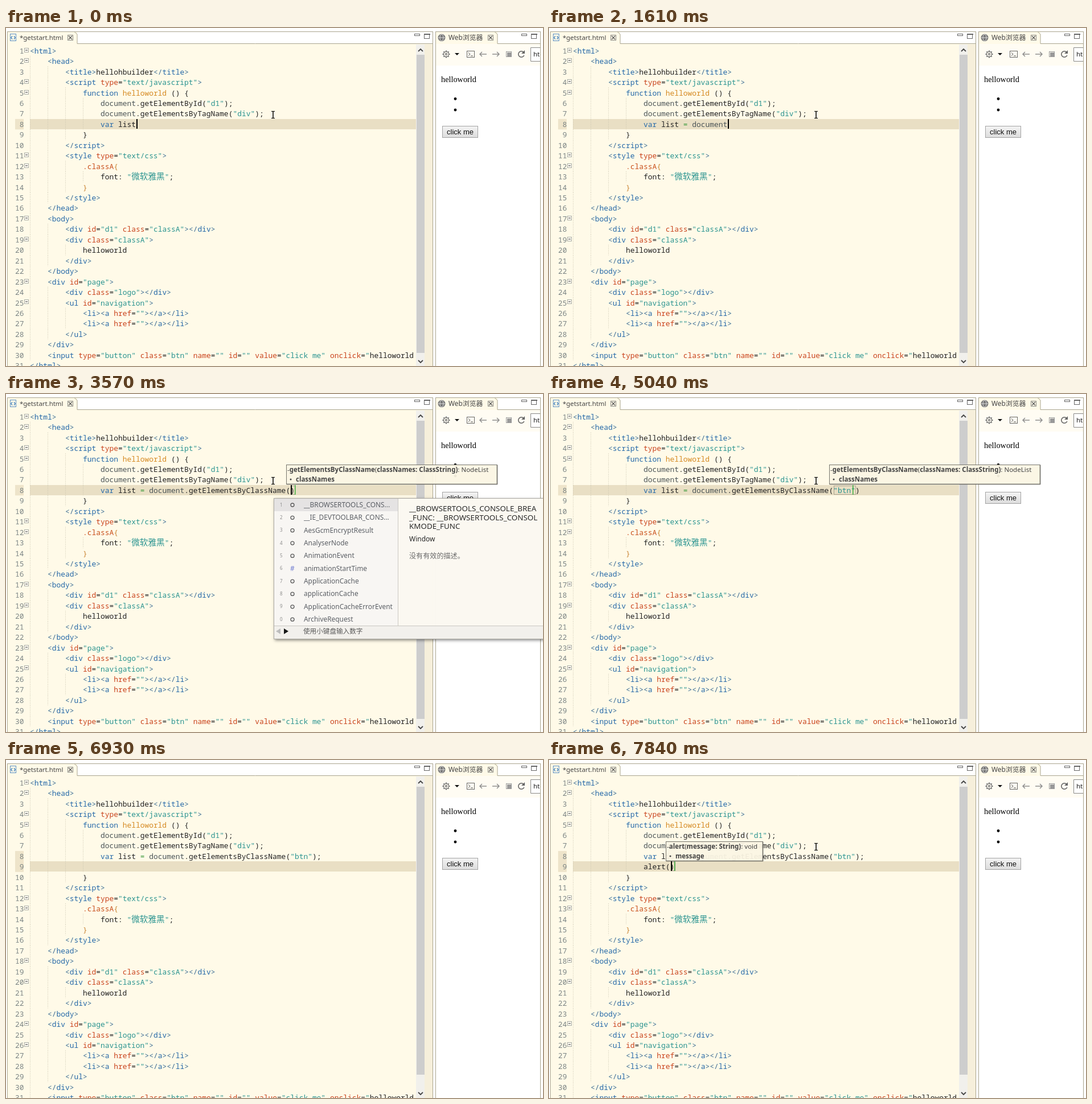
An HTML page with a canvas for the animation above (8000 ms loop, 943 by 594 pixels).

```html
<!DOCTYPE html>
<html lang="en">
<head>
<meta charset="utf-8">
<title>Code editor typing</title>
<style>
html, body { margin: 0; width: 100%; height: 100%; overflow: hidden; background: #fff; }
canvas { display: block; }
</style>
</head>
<body>
<canvas id="stage" width="943" height="594"></canvas>
<script>
const g = document.getElementById('stage').getContext('2d');
const LOOP = 8000, CELL = 7.75, ROW = 18.45, LEFT = 42, TOP = 30.7;
const CREAM = '#fffae8', EDGE = '#aaa58e', BAND = '#e9dfc4';
const MONO = '12.9px "Noto Sans Mono", monospace';
const sans = (size, bold = '') => `${bold} ${size}px "Noto Sans", "Noto Sans CJK SC", "Noto Sans CJK", sans-serif`;

// A leading digit gives the indent level of each line.
const head = [
  '0<html>',
  '1<head>',
  '2<title>hellohbuilder</title>',
  '2<script type="text/javascript">',
  '3function helloworld () {',
  '4document.getElementById("d1");',
  '4document.getElementsByTagName("div");'
];
const tail = [
  '3}',
  '2<\/script>',
  '2<style type="text/css">',
  '3.classA{',
  '4font: "微软雅黑";',
  '3}',
  '2</style>',
  '1</head>',
  '1<body>',
  '2<div id="d1" class="classA"></div>',
  '2<div class="classA">',
  '3helloworld',
  '2</div>',
  '1</body>',
  '1<div id="page">',
  '2<div class="logo"></div>',
  '2<ul id="navigation">',
  '3<li><a href=""></a></li>',
  '3<li><a href=""></a></li>',
  '2</ul>',
  '1</div>',
  '1<input type="button" class="btn" name="" id="" value="click me" onclick="helloworld',
  '0</html>'
];
const foldable = /^\d(<html|<head|<script|function|<style|\.classA|<body|<div class="classA">|<div id="page|<ul)/;

// Token kinds in order of priority, each with its colour.
const kinds = [
  [/"[\w\/ ]*"|"/, '#2a9490'],
  [/<\/?|>/, '#3d6c93'],
  [/(?<=<\/?)\w+|function|var(?= )/, '#2468a8'],
  [/\w+(?==)/, '#c9431c'],
  [/helloworld(?= \()/, '#d58a22'],
  [/\.classA/, '#c9501c'],
  [/[一-龥]+/, '#2a9490'],
  [/=(?= |$)/, '#3f9b3f'],
  [/document/, '#4c5557'],
  [/\w+|\s+|[^\w\s]/, '#222']
];
const WIDE = 6;
const TOKEN = new RegExp(kinds.map(k => `(${k[0].source})`).join('|'), 'g');

const rect = (x, y, w, h, color) => { g.fillStyle = color; g.fillRect(x, y, w, h); };
const frame = (x, y, w, h, color) => {
  g.strokeStyle = color; g.lineWidth = 1; g.strokeRect(x, y, w, h);
};
function text(s, x, y, font, color = '#333') {
  g.font = font; g.fillStyle = color; g.fillText(s, x, y);
  return x + g.measureText(s).width;
}
function path(points, color, width = 1, fill = false) {
  g.beginPath();
  points.forEach(([x, y]) => g.lineTo(x, y));
  g.lineWidth = width; g.strokeStyle = g.fillStyle = color;
  fill ? g.fill() : g.stroke();
}
function disc(x, y, r, color, hollow) {
  g.beginPath(); g.arc(x, y, r, 0, 7);
  g.strokeStyle = g.fillStyle = color; g.lineWidth = 1.3;
  hollow ? g.stroke() : g.fill();
}
const colX = c => LEFT + CELL * c, rowY = i => TOP + ROW * i;

function codeLine(line, i, lines) {
  const level = +line[0], css = /font:/.test(lines[i - 1]);
  const y = rowY(i);
  g.setLineDash([1, 2]);
  for (let k = 0; k < level; k++) {
    const x = Math.round(colX(4 * k)) + .5;
    path([[x, y], [x, y + ROW]], '#c8c3ae');
  }
  g.setLineDash([]);
  let x = colX(4 * level);
  for (const m of line.slice(1).matchAll(TOKEN)) {
    const s = m[0], kind = m.slice(1).findIndex(Boolean);
    const wide = kind === WIDE;
    const brace = /[{}]/.test(s) && (css || line[1] === '.');
    text(s, x, y + 14, wide ? sans(14.6) : MONO, brace ? '#c98432' : kinds[kind][1]);
    x += s.length * (wide ? 14.65 : CELL);
  }
}

function gutter(line, i) {
  const y = rowY(i);
  g.textAlign = 'right';
  text(i + 1, 31.5, y + 14, MONO, '#7b8484');
  g.textAlign = 'left';
  if (!foldable.test(line)) return;
  const t = Math.round(y) + 4.5;
  rect(32, t, 7, 7, '#fffdf5');
  frame(32.5, t, 7, 7, '#a9aca4');
  path([[34, t + 3.5], [38, t + 3.5]], '#333');
}

function closeBox(x, y) {
  frame(x - 4.5, y - 4.5, 9, 9, '#8a8a84');
  path([[x - 3, y - 3], [x + 3, y + 3]], '#555', 1.2);
  path([[x + 3, y - 3], [x - 3, y + 3]], '#555', 1.2);
}
function paneButtons(x, y) {
  frame(x + .5, y + .5, 9, 3, '#666');
  frame(x + 17.5, y + .5, 9, 8, '#666');
  rect(x + 17, y, 11, 2, '#666');
}
function gear(x, y, r) {
  for (let k = 0; k < 8; k++) {
    const c = Math.cos(k * Math.PI / 4), s = Math.sin(k * Math.PI / 4);
    path([[x + c * r, y + s * r], [x + c * (r + 2), y + s * (r + 2)]], '#777', 2);
  }
  disc(x, y, r, '#777', true);
  disc(x, y, r / 3, '#777', true);
}
function pane(x, w, tab) {
  rect(x, 28, w, 570, CREAM);
  rect(x, 6, tab, 23, CREAM);
  frame(x + .5, 6.5, w - 1, 600, EDGE);
  path([[x + tab - 5, 6.5], [x + tab, 11], [x + tab, 27.5], [x + w, 27.5]], EDGE);
}

function chrome() {
  rect(0, 0, 943, 594, '#fff');
  pane(2, 748, 123);
  frame(7.5, 10.5, 10, 12, '#5b8fc4');
  path([[11, 14], [9, 17], [11, 20]], '#2f75b8', 1.3);
  path([[14, 14], [16, 17], [14, 20]], '#2f75b8', 1.3);
  text('*getstart.html', 24, 21, sans(11.4), '#444');
  closeBox(113, 17);
  paneButtons(717, 10);

  pane(754, 185, 109);
  disc(765, 17, 6.5, '#777');
  g.lineWidth = 1; g.strokeStyle = '#ddd';
  g.beginPath(); g.ellipse(765, 17, 3, 6, 0, 0, 7); g.stroke();
  path([[759, 17], [771, 17]], '#ddd');
  text('Web浏览器', 777, 21, sans(11.9), '#444');
  closeBox(851, 17);
  paneButtons(905, 10);
  rect(755, 28, 183, 38, '#fffcf3');
  rect(755, 66, 183, 528, '#fff');
  gear(773, 46, 4.5);
  path([[788, 44], [796, 44], [792, 48]], '#111', 1, true);
  frame(809.5, 40.5, 13, 11, '#666');
  path([[812, 43], [815, 46], [812, 49]], '#555');
  path([[816, 49], [820, 49]], '#555');
  for (const [x, d] of [[838, 1], [860, -1]]) {
    path([[x - 6 * d, 46], [x + 6 * d, 46]], '#888', 1.4);
    path([[x - 2 * d, 42], [x - 6 * d, 46], [x - 2 * d, 50]], '#888', 1.4);
  }
  frame(878.5, 41.5, 9, 9, '#999');
  rect(880, 43, 7, 7, '#999');
  g.beginPath(); g.arc(905, 46, 5.2, .4, 5.5);
  g.lineWidth = 1.6; g.strokeStyle = '#666'; g.stroke();
  path([[911, 39], [911, 45], [905, 45]], '#666', 1, true);
  rect(922, 35, 16, 23, '#fff');
  path([[938, 34.5], [921.5, 34.5], [921.5, 58.5], [938, 58.5]], '#888');
  text('ht', 926, 50, sans(11.5), '#222');

  text('helloworld', 764, 95, '14.3px "Liberation Serif", serif', '#000');
  disc(789, 124.5, 2.4, '#000');
  disc(789, 144, 2.4, '#000');
  const shade = g.createLinearGradient(0, 172, 0, 193);
  shade.addColorStop(0, '#f4f4f4'); shade.addColorStop(1, '#dcdcdc');
  rect(766, 172, 63, 21, shade);
  frame(766.5, 172.5, 62, 20, '#a3a3a3');
  text('click me', 774, 187, '13px "Liberation Sans", sans-serif', '#111');
}

function scrollbar(end) {
  rect(720, 29, 15, 565, '#f1f0ec');
  rect(735, 29, 14, 565, '#f6efdb');
  rect(721, 47, 14, end - 47, '#cdcdcd');
  path([[724, 41], [728, 37], [732, 41]], '#444', 1.8);
  path([[724, 584], [728, 588], [732, 584]], '#444', 1.8);
}

// Suggestions: F marks a function, # a constant, all others are plain members.
const NO_NOTE = ['没有有效的描述。'];
const DOM_NOTE = ['http://www.w3.org/TR/2004/REC-DOM-Level-3', '-Core-20040407/core.html'];
const lists = {
  d: {
    col: 11, owner: 'Window', note: NO_NOTE, title: ['document: HTMLDocument'],
    items: ['document', 'defaultStatus', 'defaultView', 'devicePixelRatio', 'Date', 'Document',
      'DocumentFragment', 'DocumentType', 'DOMException', 'DOMParser']
  },
  doc: {
    col: 11, owner: 'Window', note: NO_NOTE, title: ['document: HTMLDocument'],
    items: ['document', 'Document', 'DocumentFragment', 'DocumentType']
  },
  all: {
    col: 20, owner: 'HTMLDocument', note: NO_NOTE, title: ['activeElement: HTMLElement'],
    items: ['activeElement', 'F addEventListener()', 'F adoptNode()', 'alinkColor', 'all', 'anchors',
      'F appendChild()', 'applets', 'attributes', 'baseURI']
  },
  get: {
    col: 20, owner: 'HTMLDocument', note: DOM_NOTE,
    title: ['getAnonymousElementByAttribute(node: HT', 'MLElement, attrName: AttrString, attrValue:', 'ValueString): NodeList'],
    items: ['F getAnonymousElementBy...', 'F getAnonymousNodes()', 'F getBoxObjectFor()', 'F getCSSCanvasContext()',
      'F getElementById()', 'F getElementsByClassName()', 'F getElementsByName()', 'F getElementsByTagName()',
      'F getElementsByTagNameN...', 'F getFeature()']
  },
  elem: {
    col: 20, owner: 'HTMLDocument', note: DOM_NOTE,
    title: ['getElementById(elementId: IDString): HTML', 'Element'],
    items: ['F getElementById()', 'F getElementsByClassName()', 'F getElementsByName()',
      'F getElementsByTagName()', 'F getElementsByTagNameN...']
  },
  win: {
    col: 43, owner: 'Window', note: NO_NOTE,
    title: ['__BROWSERTOOLS_CONSOLE_BREA', '_FUNC: __BROWSERTOOLS_CONSOL', 'KMODE_FUNC'],
    items: ['__BROWSERTOOLS_CONS...', '__IE_DEVTOOLBAR_CONS...', 'AesGcmEncryptResult', 'AnalyserNode',
      'AnimationEvent', '# animationStartTime', 'ApplicationCache', 'applicationCache',
      'ApplicationCacheErrorEvent', 'ArchiveRequest']
  },
  cls: {
    col: 43, owner: 'getstart.html', note: NO_NOTE, title: ['btn'],
    items: ['btn', 'classA', 'logo']
  },
  a: {
    col: 0, owner: 'Window', note: NO_NOTE, title: ['alert(message: String): void'],
    items: ['F alert()', 'F addEventListener()', 'applicationCache', 'Array', 'Attr', 'Audio',
      'AnalyserNode', 'AnimationEvent', 'ApplicationCache', 'ArchiveRequest']
  },
  al: {
    col: 0, owner: 'Window', note: NO_NOTE, title: ['alert(message: String): void'],
    items: ['F alert()']
  }
};

function popup({ col, items, title, owner, note }, row, alpha) {
  g.save();
  g.translate(Math.round(colX(16 + col) - 29.7), Math.round(rowY(row) + 23.4));
  g.globalAlpha = alpha * .97;
  g.shadowColor = '#0007'; g.shadowBlur = 5; g.shadowOffsetX = g.shadowOffsetY = 2;
  rect(0, 0, 531, 248, '#fffcf5');
  g.shadowColor = 'transparent';
  rect(0, 0, 218, 224, '#f8f6f3');
  rect(1, 1, 217, 22, '#e5e3e3');
  rect(0, 224, 531, 24, '#f2f0ec');
  path([[218.5, 0], [218.5, 224]], '#c9c7c2');
  path([[0, 224.5], [531, 224.5]], '#c9c7c2');
  frame(.5, .5, 530, 247, '#aaa8a2');
  items.forEach((item, i) => {
    const y = 12 + 22.35 * i;
    text((i + 1) % 10, 11, y + 2.5, sans(8), '#888');
    if (item.startsWith('F ')) {
      disc(34, y, 5.3, '#4a69bd');
      text('F', 31.8, y + 3, sans(8, 'bold'), '#fff');
    } else if (item[0] === '#') text('#', 29, y + 4, sans(12), '#6a78d0');
    else disc(33, y, 3, '#555', true);
    text(item.replace(/^[F#] /, ''), 53, y + 4, sans(11.9), '#565a60');
  });
  title.forEach((s, i) => text(s, 238, 23 + 15.5 * i, sans(13.4), '#222'));
  const y = 45 + 15.5 * (title.length - 1);
  text(owner, 238, y, sans(12), '#222');
  note.forEach((s, i) => text(s, 238, y + 30 + 15 * i, sans(12.1), '#666'));
  path([[12, 229], [12, 239], [4, 234]], '#bbb', 1, true);
  path([[18, 229], [18, 239], [26, 234]], '#111', 1, true);
  text('使用小键盘输入数字', 52, 238, sans(11.6), '#555');
  gear(515, 234, 3.5);
  rect(516, 208, 10, 13, '#2f7fb5');
  text('?', 518, 218, sans(10, 'bold'), '#fff');
  g.restore();
}

function tooltip(name, args, result, row, col, w) {
  const x = Math.round(colX(16 + col)), y = Math.round(rowY(row) - 35.6);
  g.save();
  g.globalAlpha = .94;
  rect(x, y, w, 35, '#fbf6e4');
  g.globalAlpha = 1;
  frame(x + .5, y + .5, w - 1, 34, '#77766e');
  path([[x + 1, y + 34.5], [x + w - .5, y + 34.5], [x + w - .5, y + 1]], '#6d6c65', 1.6);
  let at = text('-', x + 2, y + 13, sans(11.5), '#444');
  for (const [s, weight] of [[name, 'bold'], ['('], [args, 'bold'], [')', 'bold'], [': ' + result]])
    at = text(s, at, y + 13, sans(11.5, weight), '#444');
  disc(x + 8, y + 26, 1.5, '#444');
  text(args.split(':')[0], x + 17, y + 30, sans(11.5, 'bold'), '#444');
  g.restore();
}

function ibeam() {
  path([[466, 146.5], [472, 146.5]], '#111', 1.2);
  path([[466, 158.5], [472, 158.5]], '#111', 1.2);
  path([[469, 146], [469, 159]], '#111', 1.6);
}

// Each step changes part of the state: [time, changes].
const V = 'var list', D = V + ' = document', C = D + '.getElementsByClassName(';
const steps = [
  [0, { a: V, mouse: 1, caret: 1 }],
  [140, { a: V + ' ', mouse: 0 }],
  [350, { a: V + ' =' }],
  [630, { a: V + ' = ' }],
  [910, { a: V + ' = d', mouse: 1, list: 'd', alpha: .5 }],
  [980, { alpha: 1 }],
  [1120, { a: V + ' = do', mouse: 0 }],
  [1190, { a: V + ' = doc', list: 'doc', mouse: 1 }],
  [1610, { a: D, list: 0 }],
  [1890, { a: D + '.' }],
  [2100, { list: 'all', alpha: .5 }],
  [2170, { alpha: 1 }],
  [2380, { a: D + '.g', mouse: 0 }],
  [2450, { list: 'get' }],
  [2520, { a: D + '.ge' }],
  [2660, { a: D + '.get' }],
  [2800, { a: D + '.gete' }],
  [2870, { list: 'elem', mouse: 1 }],
  [3360, { a: C + ')', at: 43, list: 0, link: [43, 44, 44] }],
  [3430, { tip: 1 }],
  [3500, { list: 'win', alpha: .5 }],
  [3570, { alpha: 1 }],
  [3990, { a: C + '"")', at: 44, link: [43, 45, 46] }],
  [4200, { list: 'cls', alpha: .5 }],
  [4270, { alpha: 1 }],
  [4690, { caret: 0 }],
  [5040, { a: C + '"btn")', list: 0, link: [43, 48, 47.3] }],
  [5320, { at: 49, caret: 1, link: 0 }],
  [5810, { caret: 0 }],
  [6230, { a: C + '"btn");', at: null, tip: 0, caret: 1 }],
  [6440, { b: '', mouse: 0 }],
  [6930, { caret: 0 }],
  [7070, { b: 'a', caret: 1, mouse: 1, list: 'a', alpha: .5 }],
  [7140, { alpha: 1 }],
  [7280, { b: 'al', mouse: 0 }],
  [7350, { b: 'ale' }],
  [7420, { list: 'al', mouse: 1 }],
  [7770, { b: 'alert()', at: 6, list: 0, link: [6, 7, 7] }],
  [7840, { tip: 1 }]
];

function draw(t) {
  const s = Object.assign({}, ...steps.filter(([time]) => time <= t).map(step => step[1]));
  const second = s.b !== undefined, row = second ? 8 : 7;
  const lines = [...head, '4' + s.a, ...(second ? ['4' + s.b] : []), ...tail];
  const y = Math.round(rowY(row));

  chrome();
  rect(16, rowY(7), 15, ROW * (second ? 2 : 1), '#eee4ca');
  rect(LEFT, y, 678, 18, BAND);
  lines.forEach(gutter);
  g.save();
  g.beginPath(); g.rect(3, 29, 716, 565); g.clip();
  lines.forEach(codeLine);
  g.restore();
  scrollbar(second ? 553 : 571);

  if (s.link) {
    const [from, to, mark] = s.link.map(c => colX(16 + c));
    frame(Math.round(from) + 1.5, y + 1.5, Math.round(to - from) - 1, 15, '#aaa593');
    rect(Math.round(mark), y, 1.5, 17, '#3fae3f');
  }
  if (s.caret) rect(Math.round(colX(16 + (s.at ?? (second ? s.b : s.a).length))) + 1, y, 2, 17, '#000');
  if (s.mouse) ibeam();
  if (s.tip) {
    if (second) tooltip('alert', 'message: String', 'void', row, 5, 171);
    else tooltip('getElementsByClassName', 'classNames: ClassString', 'NodeList', row, 42, 371);
  }
  if (s.list) popup(lists[s.list], row, s.alpha);
}

function tick() {
  draw(performance.now() % LOOP);
  requestAnimationFrame(tick);
}
tick();
</script>
</body>
</html>
```
